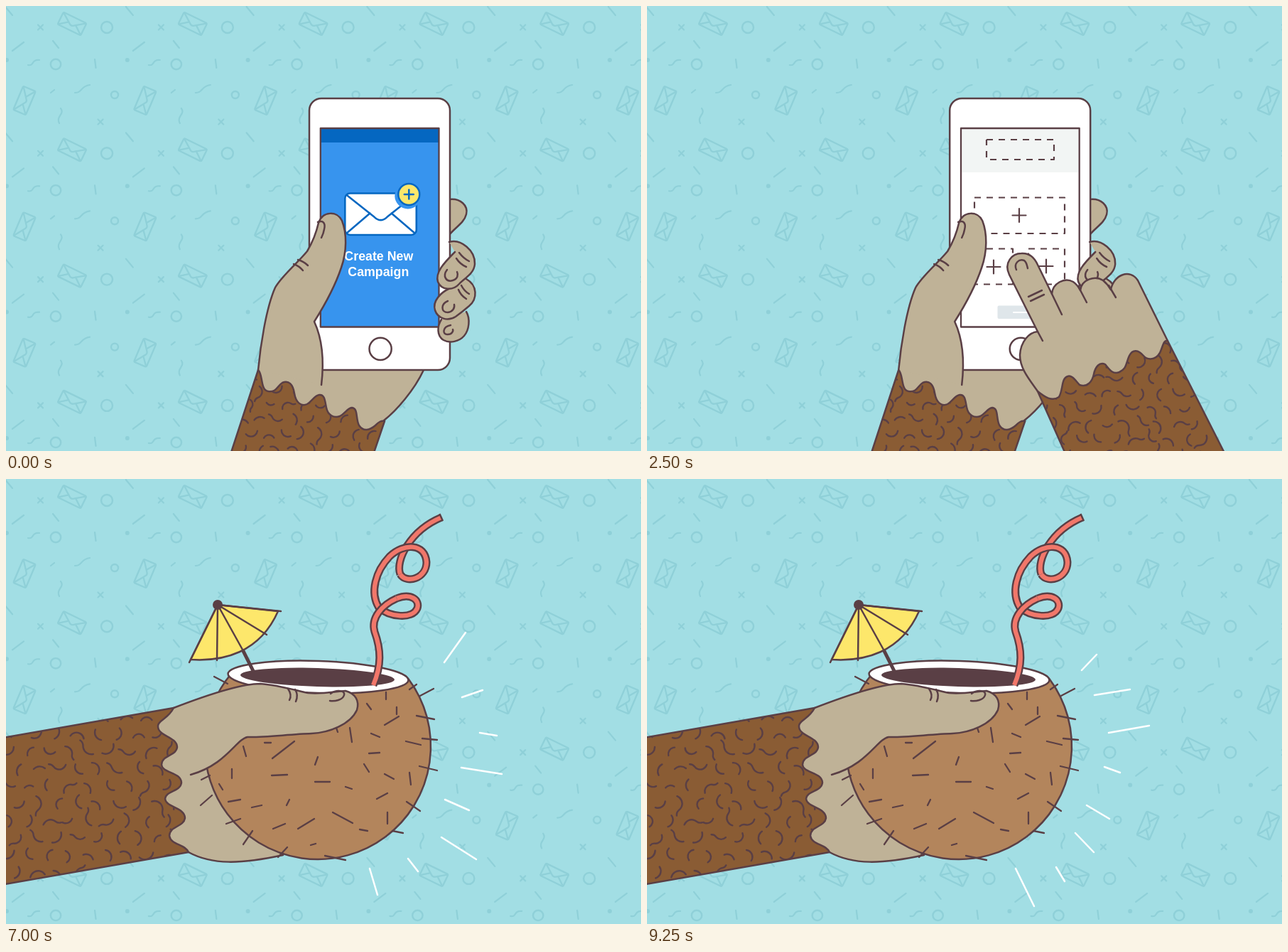
Write an HTML page with a canvas that moves like this. It is 894x626 px and loops after 10 s.

```html
<!DOCTYPE html>
<html lang="en">
<head>
<meta charset="utf-8">
<title>Campaign on the go</title>
<style>
html, body { margin: 0; width: 100%; height: 100%; overflow: hidden; background: #a2dee4; }
canvas { display: block; }
</style>
</head>
<body>
<canvas id="stage" width="894" height="626"></canvas>
<script>
const ctx = document.getElementById('stage').getContext('2d');
const INK = '#5a3f45', SKIN = '#bfb297', FUR = '#8a5c34', WHITE = '#fff';
const BLUE = '#3794ee', NAVY = '#0567c1', YELLOW = '#fde76b';
const GREEN = '#078a7a', TEAL = '#55b5a9', CORAL = '#f1776a', PATTERN = '#8fd0d8';
const LOOP = 10000;

ctx.lineCap = ctx.lineJoin = 'round';

function line(d, color = INK, width = 2.5) {
  ctx.strokeStyle = color;
  ctx.lineWidth = width;
  ctx.stroke(new Path2D(d));
}

function shape(d, fill, color = INK, width = 2.5) {
  ctx.fillStyle = fill;
  ctx.fill(new Path2D(d));
  if (color) line(d, color, width);
}

function box(x, y, w, h, fill, color, width = 2.5, r = 0) {
  ctx.beginPath();
  ctx.roundRect(x, y, w, h, r);
  paint(fill, color, width);
}

function oval(x, y, rx, ry, fill, color, width = 2.5, angle = 0) {
  ctx.beginPath();
  ctx.ellipse(x, y, rx, ry, angle, 0, Math.PI * 2);
  paint(fill, color, width);
}

function paint(fill, color, width) {
  if (fill) { ctx.fillStyle = fill; ctx.fill(); }
  if (color) { ctx.strokeStyle = color; ctx.lineWidth = width; ctx.stroke(); }
}

const dot = (x, y, r, fill) => oval(x, y, r, r, fill);
const ring = (x, y, r, color, width) => oval(x, y, r, r, null, color, width);

function cross(x, y, r, color, width) {
  line(`M${x - r},${y - r}l${2 * r},${2 * r}M${x + r},${y - r}l${-2 * r},${2 * r}`, color, width);
}

function plus(x, y, r, color, width) {
  line(`M${x - r},${y}h${2 * r}M${x},${y - r}v${2 * r}`, color, width);
}

function text(str, x, y, font, color) {
  ctx.font = font;
  ctx.fillStyle = color;
  ctx.textAlign = 'center';
  ctx.fillText(str, x, y);
}

function placed(x, y, degrees, draw) {
  ctx.save();
  ctx.translate(x, y);
  ctx.rotate(degrees * Math.PI / 180);
  draw();
  ctx.restore();
}

function clipped(path, draw) {
  ctx.save();
  ctx.clip(path);
  draw();
  ctx.restore();
}

function seeded(seed) {
  return () => {
    seed = (seed * 16807) % 2147483647;
    return seed / 2147483647;
  };
}

function envelope(x, y, w, h, fill, color, width, r) {
  box(x, y, w, h, fill, color, width, r);
  const at = (u, v) => `${x + u * w},${y + v * h} `;
  line(`M${at(.03, .05)}L${at(.41, .57)}Q${at(.5, .72)}${at(.59, .57)}L${at(.97, .05)}` +
       `M${at(.03, .95)}L${at(.35, .48)}M${at(.97, .95)}L${at(.65, .48)}`, color, width);
}

function patternTile() {
  const mini = () => envelope(-18, -9.5, 36, 19, null, PATTERN, 2.3, 2);
  placed(93, 25, 26, mini);
  placed(26, 133, -67, mini);
  ring(142, 30, 8, PATTERN, 2.4);
  ring(70, 82, 7.2, PATTERN, 2.4);
  ring(153, 125, 5, PATTERN, 2.4);
  cross(48.5, 30, 3.5, PATTERN, 2.2);
  cross(133, 163, 3.5, PATTERN, 2.2);
  dot(1, 76, 3, PATTERN);
  line('M-1,1L9,13M66,49L74,59M9,63L25,51M125,75L126.500,87M63,122L68,118' +
       'M31,83C40,85 35,75 47,76M97,122C108,122 104,113 118,111M77,144C83,152 70,155 75,165', PATTERN, 2.2);
}

function background() {
  ctx.fillStyle = '#a2dee4';
  ctx.fillRect(0, 0, 894, 626);
  for (let row = 0; row < 4; row++)
    for (let col = 0; col < 6; col++)
      placed(col * 169.8, row * 177.3, 0, patternTile);
}

// Fur body with short curls scattered on a jittered grid.
function fur(d, [x0, y0, x1, y1], step, seed) {
  shape(d, FUR, null);
  const rand = seeded(seed);
  clipped(new Path2D(d), () => {
    for (let y = y0, row = 0; y < y1; y += step * .87, row++)
      for (let x = x0 + (row % 2) * step / 2; x < x1; x += step) {
        const r = step * (.3 + .12 * rand()), a = rand() * 6.28, sweep = 1.5 + rand() * .9;
        // Centre the curl, not its circle, on the grid point.
        const mid = a + sweep / 2;
        const cx = x + (rand() - .5) * 5 - r * .75 * Math.cos(mid);
        const cy = y + (rand() - .5) * 5 - r * .75 * Math.sin(mid);
        ctx.beginPath();
        ctx.arc(cx, cy, r, a, a + sweep);
        if (rand() < .25) {
          const end = a + sweep;
          ctx.arc(cx + 1.8 * r * Math.cos(end), cy + 1.8 * r * Math.sin(end), r * .8,
                  end + Math.PI, end + Math.PI - 1, true);
        }
        paint(null, INK, 2.4);
      }
  });
  line(d);
}

function palm() {
  shape('M355,512L588,512C575,540 550,569 532,583L500,610L355,560Z', SKIN, null);
  line('M588,512C575,540 550,569 532,583');
  shape('M624,272C640,270 651,281 648,293C645,305 633,311 624,322', SKIN);
}

function frontFingers() {
  shape('M648,430C654,440 652,456 645,464C638,472 625,475 616,470C606,464 607,450 613,441', SKIN);
  line('M626,449C614,451 614,463 622,462C628,462 630,457 629,455');
  shape('M648,384C664,393 664,412 652,422C645,428 640,432 633,437C622,444 608,440 604,428C600,415 612,403 625,397', SKIN);
  line('M637,399Q640,407 648,412M641,393Q645,401 652,405M622,415C612,419 612,431 622,431C629,430 632,425 631,420');
  shape('M624,332C640,327 661,344 660,363C659,377 645,383 638,391C629,401 613,400 608,388C604,375 616,362 632,346', SKIN);
  line('M638,347Q644,355 652,359M634,355Q639,363 648,367M621,371C614,380 620,389 629,386C636,384 637,378 635,374');
}

function thumbAndSleeve() {
  shape('M355,512C358,480 366,425 379,396C388,380 410,362 424,345C433,330 437,318 440,305' +
        'C446,288 466,288 473,302C480,320 480,345 472,368C463,395 446,425 434,444C446,470 448,500 444,533', SKIN);
  line('M439,304C447,301 450,306 448,314Q447,320 444,326M405,363Q413,366 418,372M411,357Q419,359 425,365');
  fur('M355,512C362,518 358,541 369,542C381,544 382,534 389,530C398,526 404,532 406,545C408,558 416,564 424,560' +
      'C431,556 434,548 441,547C449,546 449,556 451,565C453,576 462,580 470,577C478,573 480,566 487,565' +
      'C496,566 492,580 497,590C503,599 512,597 520,590C525,585 528,583 533,584L514,640L313,640Z',
      [322, 520, 535, 640], 24, 77);
}

// Drawn with its fingertip at (526, 368).
function tappingHand([x, y, degrees]) {
  placed(x, y, degrees, () => {
    ctx.translate(-526, -368);
    const outline = 'M550,542C538,525 525,510 525,491C526,472 538,459 550,458L510,378C502,361 514,348 527,348' +
      'C539,347 546,355 550,364L570,405C571,390 588,381 600,388C606,392 608,396 610,400C612,384 631,379 642,386' +
      'C647,390 650,394 653,399C657,378 680,369 691,386L733,471';
    shape(outline + 'L740,500L600,570L563,568Z', SKIN, null);
    line(outline);
    line('M550,458L557,471M570,405L584,434M607,394L619,417M650,393L660,410' +
         'M520,371C516,362 524,355 531,358C535,361 535,366 536,369M537,409L556,400M540,415L559,406');
    fur('M733,471C727,469 726,480 722,488C715,500 703,497 699,492C692,484 684,482 679,492C674,502 676,510 665,515' +
        'C655,519 650,510 645,504C637,500 631,508 629,518C627,528 620,537 609,533C604,528 598,518 592,521' +
        'C583,524 586,540 580,550C570,557 560,550 550,542L672,816L908,816Z', [560, 480, 905, 810], 25, 4242);
  });
}

function createScreen() {
  ctx.fillStyle = BLUE;
  ctx.fillRect(441, 172, 169, 280);
  ctx.fillStyle = NAVY;
  ctx.fillRect(441, 172, 169, 20);
  envelope(476.5, 263.5, 100.5, 58.5, WHITE, NAVY, 2.6, 7);
  dot(565, 267, 18.5, BLUE);
  oval(566.5, 265, 15, 15, YELLOW, NAVY, 2.5);
  plus(566.5, 265, 6.5, NAVY, 2.5);
  const font = 'bold 17.8px "Liberation Sans", Arial, sans-serif';
  text('Create New', 524, 358, font, WHITE);
  text('Campaign', 523.5, 379.5, font, WHITE);
}

function layoutScreen() {
  ctx.fillStyle = WHITE;
  ctx.fillRect(441, 172, 169, 280);
  ctx.fillStyle = '#f2f5f4';
  ctx.fillRect(441, 172, 169, 62);
  ctx.lineCap = 'butt';
  ctx.setLineDash([9, 8]);
  for (const [x, y, w, h] of [[478, 188, 95, 28], [461, 269.5, 127, 50.5], [461, 341.5, 54, 50], [537, 341.5, 51, 50]])
    box(x, y, w, h, null, INK, 2.2);
  ctx.setLineDash([]);
  ctx.lineCap = 'round';
  for (const [x, y] of [[524, 294.5], [488, 367], [562, 366]]) plus(x, y, 9.5, INK, 2.2);
  box(493.5, 421.5, 66, 18.5, '#dfe6ea', null, 0, 2);
  line('M516,431H535', WHITE, 2.2);
}

function sparkles(points, color, r = 3.5) {
  for (const [x, y] of points)
    line(`M${x - r},${y + r * .4}l${2 * r},${-r * .8}M${x - r * .5},${y - r}l${r},${2 * r}M${x + r * .7},${y - r}l${-r * 1.4},${2 * r}`, color, 1.3);
}

function promoHeader() {
  ctx.fillStyle = YELLOW;
  ctx.fillRect(441, 172, 169, 83);
  line('M452,197C453,187 462,180 476,180', WHITE, 4);
  line('M574,246C592,246 601,238 601,225', WHITE, 6);
  sparkles([[493, 187], [515, 188], [541, 184], [558, 187], [579, 188], [597, 184], [461, 238], [517, 243], [588, 232], [554, 242]], GREEN);
  placed(525, 223, -5, () => {
    const font = 'italic 800 36px "Open Sans", sans-serif';
    text("Pellidy's", 2, 2, font, WHITE);
    text("Pellidy's", 0, 0, font, GREEN);
  });
  placed(526, 238, -2, () => text('CHILLY GROVE', 0, 0, 'italic 800 16px "Open Sans", sans-serif', CORAL));
}

function promoDrinks() {
  shape('M470,320Q488,314 495,321Q504,324 512,317L503,352Q485,358 470,352Z', '#087568', null);
  line('M509,267L495,317', YELLOW, 4.5);
  line('M465,293C473,268 515,266 521,302M461,294L523,307L522,312L460,300ZM518,313L507,354Q490,362 474,356M474,284Q478,279 485,278', WHITE, 2.4);
  line('M468,298l1,3M477,300l1,3M486,302l1,3M495,304l1,3M504,306l1,3M513,308l1,3', WHITE, 2);
  shape('M537,323C528,350 545,371 566,371C588,371 602,348 594,320C578,316 550,317 537,323Z', FUR, INK, 2);
  shape('M538,323C548,317 575,315 592,320C578,327 553,330 538,323Z', WHITE, INK, 1.5);
  line('M569,324L572,297L587,295', YELLOW, 4);
  line('M545,337l4,5M556,334l5,2M570,335l1,6M581,331l5,4M587,343l-4,6M575,349l-6,4M560,345l-3,6M548,351l5,3' +
       'M565,361l5,-3M580,359l3,-4M532,337h5M534,352l5,-2M544,364l3,-4M565,373v-4M590,363l-3,-4M598,341h-5', INK, 2);
  sparkles([[540, 277], [594, 304], [518, 359]], YELLOW);
  sparkles([[456, 268], [551, 305], [482, 373]], WHITE);
}

function promoScreen() {
  ctx.fillStyle = TEAL;
  ctx.fillRect(441, 172, 169, 280);
  promoHeader();
  promoDrinks();
  line('M441,255.500' + 'q3,1.200 6,0q3,-1 6,0'.repeat(14), GREEN, 4);
  line('M459,388H507M515,388H541M548,388H596M450,403H493M500,403H560', WHITE, 3);
  box(494.5, 420, 66, 18.5, YELLOW, null, 0, 2);
  line('M517,429.500H535', CORAL, 2.4);
}

function sendScreen() {
  promoScreen();
  ctx.fillStyle = 'rgba(60,40,40,.27)';
  ctx.fillRect(441, 172, 169, 280);
  ctx.fillStyle = BLUE;
  ctx.fillRect(441, 323, 169, 130);
  ctx.fillStyle = NAVY;
  ctx.fillRect(441, 323, 169, 12.5);
  envelope(480.5, 350.5, 90.5, 47.5, WHITE, NAVY, 2.5, 6);
  text('Ready to Send?', 525.5, 428, 'bold 13.6px "Liberation Sans", Arial, sans-serif', WHITE);
}

function burst() {
  line('M359,123L397,142M483,94L487,116M563,74L558,101M557,106L556,111M688,104L650,132M379,250L385,247' +
       'M389,245L407,235M646,246L660,262M663,265L669,270', WHITE, 2.2);
  line('M418,90C411,96 427,97 421,104C415,110 428,111 423,118M641,172' + 'c4,-5 6,4 10,0'.repeat(3) +
       'M347,209' + 'c6,-7 9,4 16.500,-3.500'.repeat(3) + 'M643,215' + 'c6,-5 10,5 16.300,1.300'.repeat(3), WHITE, 2.2);
  for (const [x, y, r] of [[505, 96, 2], [595, 107, 2], [412, 196, 2], [653, 197, 2], [407, 266, 3.2]]) dot(x, y, r, WHITE);
  for (const [x, y, r] of [[523, 113, 2.3], [641, 143, 2.3], [387, 163, 3.6], [679, 240, 3.6]]) ring(x, y, r, WHITE, 2);
  for (const [x, y, r] of [[451, 110, 2], [636, 116, 4], [358, 233, 4], [704, 258, 2.7]])
    placed(x, y, 20, () => cross(0, 0, r, WHITE, 2));
}

function phoneScene({ screen, shift, tap, sparks }) {
  if (sparks) burst();
  placed(shift, 0, 0, () => {
    placed(-.8, 0, 0, palm);
    box(426.2, 130, 198, 382, WHITE, INK, 2.5, 17);
    const display = new Path2D();
    display.rect(442, 172, 166.7, 279.5);
    clipped(display, screen);
    box(442, 172, 166.7, 279.5, null, INK, 2.3);
    oval(526.3, 482.3, 15.6, 15.6, WHITE, INK, 2.5);
    placed(-.8, 0, 0, () => {
      frontFingers();
      thumbAndSleeve();
    });
  });
  if (tap) tappingHand(tap);
}

function umbrella() {
  line('M332,238L348,270', INK, 5);
  shape('M298,177L260,254C305,257 357,245 383,186Z', YELLOW);
  line('M298,177L258,258M298,177L387,186M298,177L297,255M298,177L333,240M298,177L367,219');
  dot(298, 177, 7, INK);
}

function straw() {
  const parts = [
    'M555,134C548,115 568,73 613,54',
    'M525,181C512,160 520,130 540,109C560,90 590,90 592,117C592,140 564,148 555,134',
    'M550,168C570,160 583,170 579,182C572,198 540,194 525,181',
    'M517,290C529,262 528,240 519,215C513,195 530,177 550,168'
  ];
  ctx.lineCap = 'butt';
  for (const d of parts) {
    line(d, INK, 11);
    line(d, CORAL, 6.2);
  }
  line('M610.500,49L615,59');
  ctx.lineCap = 'round';
}

function coconut() {
  ctx.beginPath();
  ctx.moveTo(313, 274);
  ctx.lineTo(566, 281);
  ctx.arc(439, 376, 159, -.643, Math.PI + .7);
  ctx.closePath();
  paint('#b3855c', INK, 2.5);
  line('M364,371h9M334,376l4,14M375,393l31,-24M435,402l4,-11M318,408v13M374,417l22,-1M435,426h21M300,429l5,8' +
       'M313,454l17,-3M346,462l14,-3M395,459l4,-8M376,492l17,-7M411,492l23,-14M460,469l28,15M478,433l9,3M504,401l7,11' +
       'M533,415l13,7M522,450l15,-8M537,469v16M568,413l2,17M563,369l21,5M511,386l15,-1M514,358l12,5M533,346l20,-12', INK, 2.3);
  line('M484,350l3,20M508,316l6,8M535,300v10M550,321v10M429,515l7,-2M498,493l11,2M465,350l2,6' +
       'M293,278l19,10M275,423l12,-6M274,459l16,-14M310,485l20,-7M334,514l13,-19M383,532l13,-14M449,530l29,6' +
       'M544,495l15,3M564,454l19,13M582,404l25,6M586,365l21,2M578,333l25,5M583,305l19,-10M568,296l10,-7', INK, 2.3);
  oval(439.5, 278.5, 127, 22.5, WHITE, INK, 2.5, .035);
  oval(438.5, 279, 108.5, 13, INK, null, 0, .03);
}

function coconutScene({ rays }) {
  shape('M257,525C290,543 330,542 390,529L330,400L200,390L200,525Z', SKIN, null);
  line('M257,525C290,543 330,542 390,529');
  coconut();
  umbrella();
  straw();
  const thumb = 'M236,322C280,305 330,288 358,288C385,290 410,298 425,301C445,303 462,299 478,298C492,302 498,312 494,325' +
    'C485,345 455,357 430,358C400,359 360,364 340,363C324,366 310,402 260,416';
  shape(thumb + 'L225,420L210,340Z', SKIN, null);
  line(thumb);
  line('M457,302C465,296 478,297 476,304C474,311 463,313 456,312M397,295Q403,304 399,311M407,296Q412,304 408,313');
  fur('M236,322C228,338 213,340 214,348C214,362 240,362 241,377C240,390 219,388 219,402C220,414 246,412 247,427' +
      'C246,440 225,438 224,450C225,462 252,462 252,477C250,490 230,488 230,502C232,515 252,513 257,525L-10,571.500L-10,365Z',
      [4, 335, 250, 565], 28, 991);
  line(rays, WHITE, 2.5);
}

const raysA = 'M617,258L647,216M642,307L671,297M667,357L691,361M641,406L698,415M618,451L652,466M613,504L662,535M566,534L580,552M512,548L523,585';
const raysB = 'M612,269L633,247M630,304L680,296M650,357L707,347M644,405L666,413M619,459L651,478M603,498L629,525M576,546L588,566M519,548L545,601';

const scenes = [
  { start: 0, draw: phoneScene, screen: createScreen, shift: .8 },
  { start: 1250, draw: phoneScene, screen: createScreen, shift: .4, tap: [564.5, 320, 12.5] },
  { start: 2500, draw: phoneScene, screen: layoutScreen, shift: 0, tap: [526, 368, 0] },
  { start: 3750, draw: phoneScene, screen: promoScreen, shift: -.2, tap: [564.5, 420.5, 12.5] },
  { start: 5000, draw: phoneScene, screen: sendScreen, shift: 0, tap: [599.5, 404.5, 0], sparks: true },
  { start: 7000, draw: coconutScene, rays: raysA },
  { start: 7750, draw: coconutScene, rays: raysB },
  { start: 8500, draw: coconutScene, rays: raysA },
  { start: 9250, draw: coconutScene, rays: raysB }
];

let shown = null;
function render() {
  const time = performance.now() % LOOP;
  const scene = scenes.findLast(s => s.start <= time);
  if (scene !== shown) {
    shown = scene;
    background();
    scene.draw(scene);
  }
  requestAnimationFrame(render);
}
render();
</script>
</body>
</html>
```
